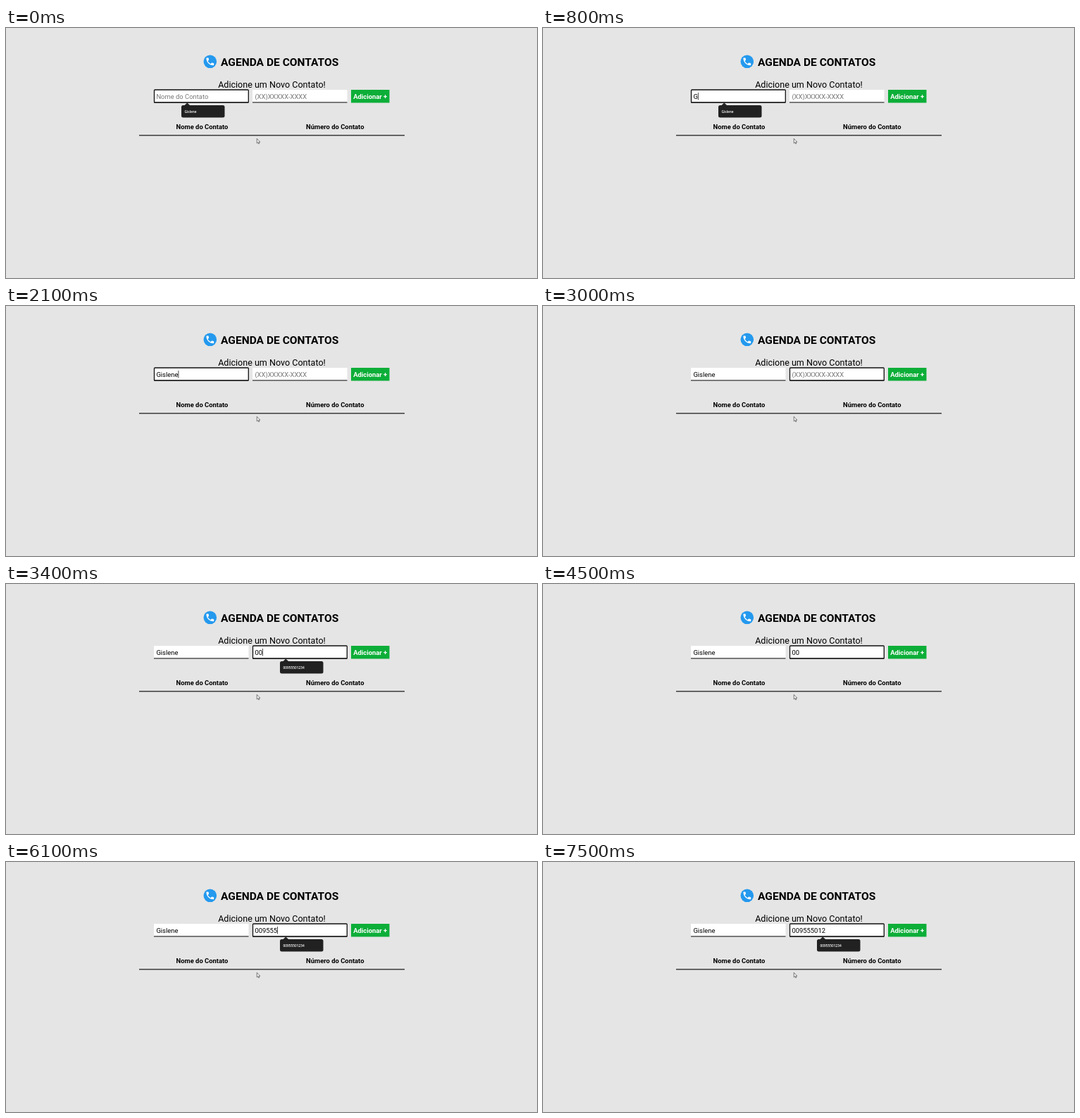
An HTML page that plays this animation: 754 px wide and 356 px high, repeating every 8 s.

```html
<!DOCTYPE html>
<html lang="pt-BR">
<head>
<meta charset="utf-8">
<title>Agenda de Contatos</title>
<style>
  html, body { margin: 0; width: 100%; height: 100%; overflow: hidden; background: #e5e5e5; }
  svg { display: block; width: 754px; height: 356px; font: 9.42px Roboto, Arial, sans-serif; }
  .bold { font-weight: 700; }
  .mid { text-anchor: middle; }
  .tip text { font: 600 4.8px "Open Sans", sans-serif; fill: #fff; }
  .ring { fill: none; stroke: #111; stroke-width: 1.3; }
  .hint { fill: #777; }
</style>
</head>
<body>
<svg viewBox="0 0 754 356">
  <circle cx="289.8" cy="47.8" r="9.3" fill="#2499ee"/>
  <path transform="translate(282.6 40.6) scale(.6)" fill="#fff"
    d="M6.6 10.8c1.5 2.8 3.8 5.1 6.6 6.6l2.2-2.2c.3-.3.7-.4 1-.3 1.1.4 2.3.6 3.6.6.6 0 1 .5 1 1V20c0 .6-.4 1-1 1C10.600 21 3 13.400 3 4c0-.6.5-1 1-1h3.500c.6 0 1 .4 1 1 0 1.300.2 2.500.6 3.600.1.4 0 .7-.3 1z"/>
  <text class="bold" x="305" y="53.5" font-size="15.55">AGENDA DE CONTATOS</text>
  <text class="mid" x="377.500" y="85" font-size="12.56">Adicione um Novo Contato!</text>

  <g id="fields"></g>

  <rect x="490" y="88" width="54.5" height="18.5" fill="#0cae38"/>
  <text class="bold mid" x="517.2" y="100.7" fill="#fff">Adicionar +</text>

  <text class="bold mid" x="278.5" y="144">Nome do Contato</text>
  <text class="bold mid" x="467.300" y="144">Número do Contato</text>
  <rect x="189" y="152.300" width="377" height="1.2" fill="#111"/>

  <path d="M356.300 157.500v6.600l1.500-1.300 1 2.200 1-.5-1-2.100h2z" fill="#fff" stroke="#444" stroke-width=".7"/>
</svg>

<script>
const LOOP = 8000;
const NAME = "Gislene", PHONE = "00955501234";

// Each row: start time and the values that change then.
const steps = [
  [0,    { focus: 0, name: 0, phone: 0, tip: true, caret: false }],
  [800,  { name: 1, caret: true }],
  [1100, { name: 2 }],
  [1200, { name: 3 }],
  [1300, { name: 5 }],
  [1700, { name: 7, tip: false }],
  [2600, { focus: 1, caret: false }],
  [3300, { phone: 1, tip: true, caret: true }],
  [3400, { phone: 2 }],
  [4000, { tip: false }],
  [4500, { caret: false }],
  [5000, { tip: true, caret: true }],
  [5500, { phone: 4 }],
  [5800, { phone: 5 }],
  [6000, { phone: 6 }],
  [6400, { phone: 7 }],
  [6600, { phone: 8 }],
  [6700, { phone: 9 }],
  [7500, { caret: false }]
];

function makeField(x, hint, value) {
  const g = document.createElementNS("http://www.w3.org/2000/svg", "g");
  g.setAttribute("transform", `translate(${x} 0)`);
  g.innerHTML = `
    <rect y="88" width="134.5" height="18.5" fill="#fff"/>
    <rect y="105.4" width="134.5" height="1.1" fill="#111"/>
    <rect class="ring" x=".5" y="88" width="133.8" height="18.2" rx="1"/>
    <text class="value" x="3.4" y="100.5"></text>
    <rect class="caret" y="92" width=".8" height="10.5" fill="#222"/>
    <g class="tip">
      <path d="M43 110.500l4.300-4 4.300 4z" fill="#222"/>
      <rect x="39" y="110" width="61.5" height="17.500" rx="2.500" fill="#212121"/>
      <text x="43.500" y="120.600">${value}</text>
    </g>`;
  document.getElementById("fields").append(g);
  const [ring, text, caret, tip] = [".ring", ".value", ".caret", ".tip"].map(s => g.querySelector(s));
  const show = (el, on) => el.setAttribute("visibility", on ? "visible" : "hidden");

  return (count, focused, state) => {
    text.textContent = count ? value.slice(0, count) : hint;
    text.classList.toggle("hint", !count);
    caret.setAttribute("x", 3.5 + (count ? text.getComputedTextLength() : 0));
    show(ring, focused);
    show(caret, focused && state.caret);
    show(tip, focused && state.tip);
  };
}

const drawName = makeField(210, "Nome do Contato", NAME);
const drawPhone = makeField(350, "(XX)XXXXX-XXXX", PHONE);

function frame() {
  const t = performance.now() % LOOP;
  const state = Object.assign({}, ...steps.filter(([at]) => at <= t).map(([, change]) => change));
  drawName(state.name, state.focus === 0, state);
  drawPhone(state.phone, state.focus === 1, state);
  requestAnimationFrame(frame);
}
frame();
</script>
</body>
</html>
```
